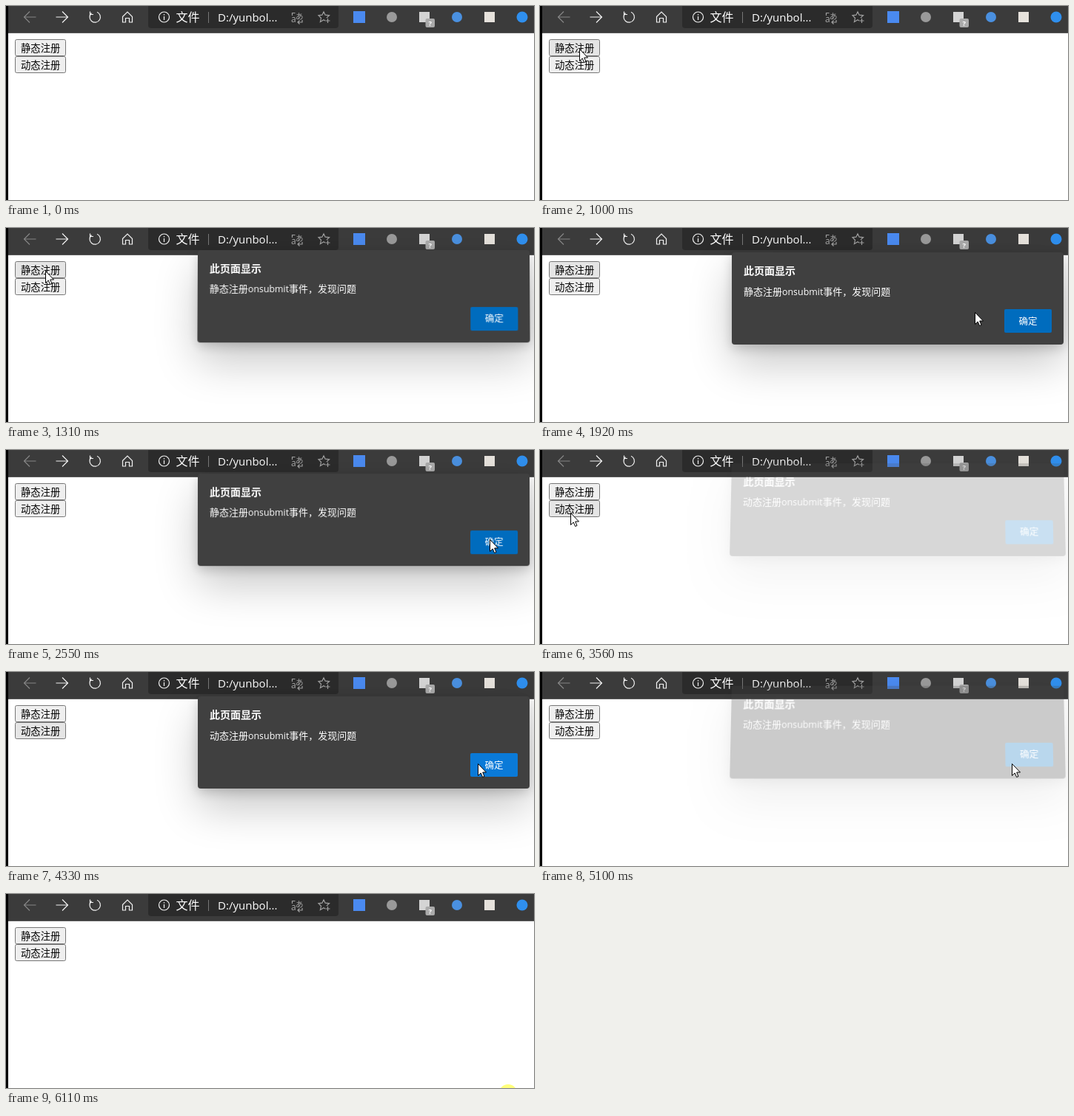
These frames come from a looping animation (713x263 px, 6200 ms). An HTML page:

```html
<!DOCTYPE html>
<html lang="zh">
<head>
<meta charset="utf-8">
<title>onsubmit</title>
<style>
  html, body { margin: 0; width: 100%; height: 100%; overflow: hidden; background: #fff; }
  svg { display: block; position: absolute; left: 0; top: 0; overflow: visible; }
  text { font-family: "Open Sans", "Noto Sans CJK SC", "Noto Sans CJK", "Noto Sans CJK JP", sans-serif; }
  #stage { position: absolute; left: 0; top: 0; width: 713px; height: 263px; overflow: hidden; }
  #dialog {
    position: absolute; left: 259px; top: 33px; width: 448px; height: 125px;
    border-radius: 4px; background: #404040; transform-origin: 50% 0;
    box-shadow: 0 25.6px 57.6px rgba(0,0,0,.22), 0 4.8px 14.4px rgba(0,0,0,.18);
  }
  .line { fill: none; stroke: #f2f2f2; stroke-width: 1.2; }
  .dim { stroke: #858585; }
  .soft { stroke: #a0a0a0; }
  .push { fill: #efefef; stroke: #767676; }
  .push.hot { fill: #e5e5e5; }
</style>
</head>
<body>
<div id="stage">
  <svg width="713" height="263">
    <rect width="3" height="263"/>
    <rect x="3" width="710" height="36" fill="#3b3b3b"/>
    <rect x="3" y="36" width="710" height="1" fill="#5c5c5c"/>
    <path d="M192 0H449V26a4 4 0 0 1-4 4H196a4 4 0 0 1-4-4Z" fill="#2b2b2b"/>

    <path class="line dim" d="M40.500 15H25M32 7.500L24.500 15L32 22.500"/>
    <path class="line" d="M67.500 15H83M76 7.500L83.500 15L76 22.500"/>
    <path class="line" d="M115.500 9.500A7.200 7.200 0 1 0 123 8.300M113.500 7.500V11.500H118"/>
    <path class="line" d="M157.500 14.500L164 8L170.500 14.500V22H166.500V16.500H161.500V22H157.500Z"/>
    <g class="line">
      <circle cx="213.500" cy="15" r="7"/>
      <path d="M213.500 14V19M213.500 11V12.500"/>
    </g>
    <text x="229.500" y="21" font-size="16" fill="#fff">文件</text>
    <path d="M273.500 8V23" stroke="#777"/>
    <text x="286" y="20.500" font-size="15" fill="#fff">D:/yunbol...</text>

    <g fill="#a8a8a8">
      <text x="385" y="22" font-size="12">a</text>
      <text x="391" y="18" font-size="10.500">あ</text>
    </g>
    <path class="line soft" d="M386.500 13V9.500H390.500M400 19V22H394M396.500 19.500L394 22L396.500 24.500"/>
    <path class="line soft" d="M431 20L429 18.800L424.400 21.500L425.500 16.300L422 12.800L426.900 12.200L429 7.800L431.100 12.200L436.500 12.800L433 16M434.500 17V23M431.500 20H437.500"/>

    <rect x="469" y="7" width="16" height="16" fill="#4a8af0"/>
    <circle cx="521" cy="15" r="7" fill="#9a9a9a"/>
    <rect x="558" y="8" width="14" height="14" fill="#d4d4d4"/>
    <rect x="566.500" y="17" width="12.500" height="12" rx="2" fill="#aaa"/>
    <text x="572.700" y="26.500" font-size="9.500" font-weight="700" fill="#fff" text-anchor="middle">?</text>
    <circle cx="609" cy="15" r="7" fill="#4a90e0"/>
    <rect x="646" y="8" width="14" height="14" fill="#e6e2dc"/>
    <circle cx="697" cy="15" r="7.500" fill="#2f8fee"/>

    <g font-size="13.333">
      <rect class="push" x="12.500" y="45.500" width="68" height="22" rx="2"/>
      <text x="20" y="62">静态注册</text>
      <rect class="push" x="12.500" y="68.500" width="68" height="22" rx="2"/>
      <text x="20" y="85">动态注册</text>
    </g>
    <circle id="click" cx="678" cy="270.500" r="12.500" fill="#ffff7a"/>
  </svg>

  <div id="dialog">
    <svg width="448" height="125" fill="#fff">
      <text x="16" y="30" font-size="14" font-weight="700">此页面显示</text>
      <text x="16" y="57.500" font-size="13" font-weight="500"><tspan id="kind"></tspan>态注册<tspan font-size="12.400">onsubmit</tspan>事件，发现问题</text>
      <rect id="ok" x="368" y="77" width="64" height="32" rx="2"/>
      <text x="400" y="97.500" font-size="12.500" font-weight="500" text-anchor="middle">确定</text>
    </svg>
  </div>

  <svg width="713" height="263">
    <path id="cursor" d="M.5 .5V16.500L4.200 13L6.600 18.500L9 17.500L6.700 12H11.500Z" fill="#fff" stroke="#000" stroke-linejoin="round"/>
  </svg>
</div>

<script>
const LOOP = 6200, STEP = LOOP / 80, PHASE = 0.2;
const OPEN_MS = 300, CLOSE_MS = 88, LIFT = 17;

const $ = id => document.getElementById(id);
const dialog = $('dialog'), ok = $('ok'), kind = $('kind'), cursor = $('cursor'), click = $('click');
const pushes = document.querySelectorAll('.push');

const entry = { x: 507, y: 224 };
const moves = [
  { from: 100, to: 840, x: 53, y: 58 },
  { from: 1350, to: 2020, x: 653, y: 121 },
  { from: 2600, to: 3170, x: 41, y: 85 },
  { from: 3570, to: 4320, x: 637, y: 124 },
  { from: 5110, to: 5640, x: 537, y: 239 }
];
const showings = [
  { kind: '静', hover: 760, open: 1128, press: 2380, close: 2522 },
  { kind: '动', hover: 3080, open: 3530, press: 4860, close: 5019 }
];

const progress = (t, from, to) => Math.min(1, Math.max(0, (t - from) / (to - from)));
const easeOut = p => 1 - (1 - p) ** 1.65;

function pointerAt(t) {
  let { x, y } = entry;
  for (const move of moves) {
    const p = easeOut(progress(t, move.from, move.to));
    x += (move.x - x) * p;
    y += (move.y - y) * p;
  }
  return [Math.round(x), Math.round(y)];
}

function liftAt(t, { open, close }) {
  const away = 1 - progress(t, open, open + OPEN_MS) + progress(t, close, close + CLOSE_MS);
  return LIFT * away ** 2;
}

function drawDialog(t, show, x, y) {
  dialog.style.display = show ? '' : 'none';
  if (!show) return;
  const lift = liftAt(t, show);
  dialog.style.opacity = Math.min(1, (LIFT - lift) / 10);
  dialog.style.transform = lift < 0.5 ? 'none'
    : `perspective(1000px) translateY(${-lift}px) rotateX(${lift * 0.4}deg)`;
  kind.textContent = show.kind;
  const hover = x >= 627 && y >= 110 && t < show.press;
  ok.setAttribute('fill', hover ? '#0a7ad8' : '#006cbe');
}

function draw(t) {
  const [x, y] = pointerAt(t);
  cursor.style.display = t > 120 && t < 5700 ? '' : 'none';
  cursor.setAttribute('transform', `translate(${x} ${y})`);
  click.style.display = t > 6100 ? '' : 'none';
  showings.forEach(({ hover, close }, i) =>
    pushes[i].classList.toggle('hot', t >= hover && t < close));
  drawDialog(t, showings.find(s => t >= s.open && t < s.close + CLOSE_MS), x, y);
}

// The picture advances in even steps, like a choppy screen recording.
const start = performance.now();
function frame() {
  const t = (performance.now() - start) % LOOP;
  draw((Math.floor(t / STEP + PHASE) - PHASE) * STEP);
  requestAnimationFrame(frame);
}
frame();
</script>
</body>
</html>
```
